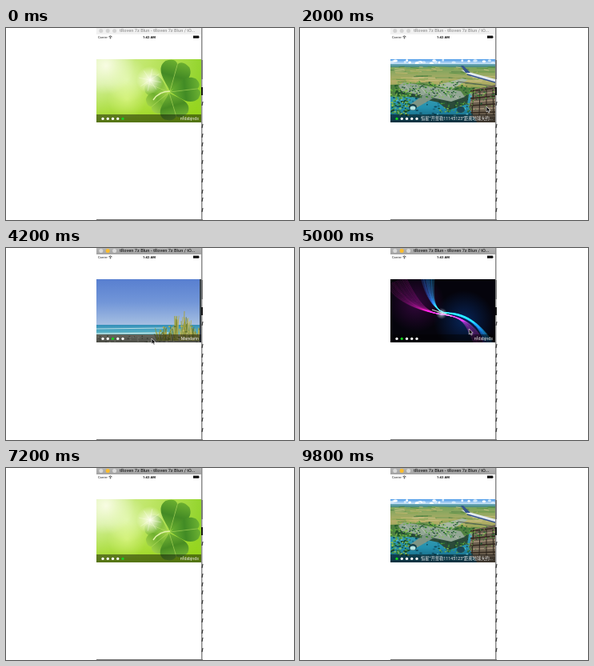
Write an HTML page with a canvas that moves like this. It is 360x240 px and loops after 10 s.

```html
<!DOCTYPE html>
<html lang="en">
<head>
<meta charset="utf-8">
<title>Carousel</title>
<style>
  html, body { margin: 0; width: 100%; height: 100%; overflow: hidden; background: #fff; }
  canvas { display: block; width: 360px; height: 240px; }
</style>
</head>
<body>
<canvas id="stage" width="360" height="240"></canvas>
<script>
const ctx = document.getElementById('stage').getContext('2d');
const LOOP = 10000, STEP = 200;
const W = 131, H = 79, X = 113, Y = 39;
const SANS = 'Roboto, "Noto Sans CJK SC", "Noto Sans CJK", sans-serif';

function random(seed) {
  return () => (seed = (seed * 16807) % 2147483647) / 2147483647;
}

function picture(draw) {
  const c = document.createElement('canvas');
  c.width = W;
  c.height = H;
  draw(c.getContext('2d'));
  return c;
}

function rect(g, color, x, y, w, h) {
  g.fillStyle = color;
  g.fillRect(x, y, w, h);
}

function shape(g, color, ...pts) {
  g.fillStyle = color;
  g.beginPath();
  pts.forEach(([x, y]) => g.lineTo(x, y));
  g.fill();
}

function disc(g, color, x, y, r, ry = r) {
  g.fillStyle = color;
  g.beginPath();
  g.ellipse(x, y, r, ry, 0, 0, 7);
  g.fill();
}

function line(g, color, width, x1, y1, x2, y2) {
  g.strokeStyle = color;
  g.lineWidth = width;
  g.beginPath();
  g.moveTo(x1, y1);
  g.lineTo(x2, y2);
  g.stroke();
}

function gradient(g, x1, y1, x2, y2, ...colors) {
  const fill = g.createLinearGradient(x1, y1, x2, y2);
  colors.forEach((c, i) => fill.addColorStop(i / (colors.length - 1), c));
  return fill;
}

function glow(g, rgb, alpha, x, y, r) {
  const fill = g.createRadialGradient(x, y, 0, x, y, r);
  fill.addColorStop(0, `rgba(${rgb},${alpha})`);
  fill.addColorStop(1, `rgba(${rgb},0)`);
  rect(g, fill, x - r, y - r, r * 2, r * 2);
}

function specks(g, rnd, colors, n, x, y, w, h, size = 2) {
  for (let i = 0; i < n; i++) {
    const color = colors[Math.floor(rnd() * colors.length)];
    disc(g, color, x + rnd() * w, y + rnd() * h, size * (0.4 + rnd() * 0.6), size * 0.5);
  }
}

// Heart-shaped leaf growing from (x, y) along an angle.
function leaf(g, x, y, angle, len, wide, light, dark) {
  g.save();
  g.translate(x, y);
  g.rotate(angle);
  g.fillStyle = gradient(g, 0, 0, len, 0, light, dark, light);
  for (const s of [-1, 1]) {
    g.beginPath();
    g.moveTo(0, 0);
    g.bezierCurveTo(len * 0.25, s * wide * 0.25, len * 0.55, s * wide * 0.85, len * 0.9, s * wide * 0.5);
    g.quadraticCurveTo(len * 1.08, s * wide * 0.15, len * 0.9, 0);
    g.fill();
  }
  line(g, 'rgba(190,225,110,.6)', 0.7, 0, 0, len * 0.9, 0);
  g.restore();
}

function drawClover(g) {
  rect(g, gradient(g, 0, 0, W, 20, '#d6f0a4', '#bfe667', '#93d42c'), 0, 0, W, H);
  rect(g, gradient(g, 0, 30, 0, H, 'rgba(160,220,30,0)', 'rgba(148,210,16,.85)'), 0, 30, W, H);
  glow(g, '255,255,240', 0.85, 12, 8, 36);
  glow(g, '240,255,200', 0.6, 38, 26, 28);
  glow(g, '235,255,150', 0.5, 38, 50, 24);
  leaf(g, 90, 41, -2.75, 30, 22, '#a5d550', '#79b938');
  leaf(g, 90, 42, 2.45, 30, 23, '#a0d148', '#70b030');
  leaf(g, 92, 40, -1.3, 39, 31, '#6cb030', '#438a25');
  leaf(g, 92, 41, -0.12, 38, 25, '#6cb232', '#418b25');
  leaf(g, 91, 42, 1.28, 34, 30, '#74b536', '#488c22');
  g.strokeStyle = '#e2f3aa';
  g.lineWidth = 1.4;
  g.beginPath();
  g.moveTo(92, 40);
  g.quadraticCurveTo(78, 40, 71, 51);
  g.stroke();
  glow(g, '255,255,240', 1, 67, 26, 17);
  for (let i = 0; i < 8; i++) {
    const a = i * Math.PI / 4 + 0.2;
    line(g, 'rgba(255,255,240,.5)', 0.7, 67, 26, 67 + Math.cos(a) * 14, 26 + Math.sin(a) * 14);
  }
}

function drawAirfield(g) {
  const rnd = random(41);
  const greens = ['#2c7a34', '#4c9c3c', '#1f5c30', '#6fae44', '#174426', '#8cc058'];
  const meadow = ['#558f45', '#86a752', '#c9bb78', '#a8ad5e', '#467c42', '#d0c58c'];
  rect(g, gradient(g, 0, 0, 0, 7, '#4c9ae8', '#e6f3fb'), 0, 0, W, 7);
  specks(g, rnd, ['#ffffff', '#d4e9fa'], 26, 0, 1, W, 4, 3);
  rect(g, gradient(g, 0, 6, 0, 11, '#6aa9c0', '#3f7f68'), 0, 6, W, 5);
  rect(g, gradient(g, 0, 10, 0, 45, '#78a35c', '#b3ae68', '#7f9a48'), 0, 10, W, 40);
  for (let i = 0; i < 110; i++) {
    const x = rnd() * W - 8, y = 9 + rnd() * 27, len = 4 + rnd() * 18;
    line(g, meadow[i % 6], 0.8, x, y, x + len, y + (rnd() - 0.3) * 2);
  }
  // pools
  rect(g, gradient(g, 0, 42, 0, H, '#3f9faf', '#2390ae', '#145a74'), 0, 43, W, 36);
  specks(g, rnd, ['#5cc3d2', '#176c86', '#0f4c60'], 60, 0, 46, 110, 26, 2);
  shape(g, '#4f8040', [0, 32], [40, 30], [104, 36], [92, 52], [42, 48], [0, 46]);
  // overgrown aircraft
  shape(g, '#2b4a3a', [12, 38], [74, 52], [98, 44], [96, 56], [72, 64], [60, 54], [14, 44]);
  shape(g, '#93a795', [10, 33], [17, 29], [88, 40], [93, 47], [76, 53], [14, 40]);
  shape(g, '#7d9484', [44, 43], [58, 46], [34, 60], [20, 60]);
  shape(g, '#a9b9a4', [56, 33], [90, 24], [97, 26], [76, 38]);
  specks(g, rnd, greens, 210, 6, 28, 90, 20, 1.5);
  specks(g, rnd, greens, 130, 0, 38, 26, 32, 1.8);
  specks(g, rnd, greens, 70, 60, 53, 48, 14, 1.6);
  for (let i = 0; i < 7; i++) line(g, '#c6cfbb', 0.7, 18 + i * 10, 32 + i * 1.5, 24 + i * 10, 39 + i * 1.7);
  // second aircraft and its tail
  shape(g, '#e3eaf0', [88, 13], [98, 16], [131, 25], [131, 29], [102, 22]);
  shape(g, '#35538f', [88, 8], [91, 8], [100, 17], [94, 17]);
  line(g, '#35508a', 1.4, 96, 19, 131, 29);
  line(g, '#4d5c50', 1, 84, 28, 131, 34);
  // ruined structure
  shape(g, '#6d6150', [104, 38], [131, 32], [131, 79], [108, 79], [98, 60]);
  for (let i = 0; i < 8; i++) line(g, i % 2 ? '#a5927a' : '#33291f', 1.3, 100, 40 + i * 4.5, 131, 36 + i * 5);
  for (let i = 0; i < 4; i++) line(g, '#2c241c', 1, 104 + i * 8, 38, 102 + i * 9, 70);
  specks(g, rnd, greens, 60, 96, 33, 35, 30, 1.4);
  disc(g, '#16414c', 28, 60, 5, 4);
  disc(g, '#b5e4e2', 28, 61, 3.5, 2.6);
  disc(g, '#1a4858', 88, 63, 5, 4);
}

function drawSwirl(g) {
  const rnd = random(97);
  rect(g, '#05040c', 0, 0, W, H);
  glow(g, '70,8,80', 0.7, 32, 30, 36);
  glow(g, '8,50,120', 0.7, 92, 52, 38);
  g.globalCompositeOperation = 'lighter';
  const strand = (color, x0, y0, x1, y1) => {
    g.strokeStyle = color;
    g.lineWidth = 0.8;
    g.beginPath();
    g.moveTo(x0, y0);
    g.bezierCurveTo(x0 + 18, 34, 48, 42, 65, 44);
    g.bezierCurveTo(92, 47, x1 - 10, y1 - 22, x1, y1);
    g.stroke();
  };
  for (let i = 0; i < 22; i++) {
    const k = i / 22;
    strand(`rgba(190,15,140,${0.14 + rnd() * 0.2})`, -6 + k * 26, 8 - k * 12, 104 + k * 14, 80);
  }
  for (let i = 0; i < 24; i++) {
    const k = i / 24;
    g.strokeStyle = `rgba(15,${110 + Math.floor(k * 70)},225,${0.15 + rnd() * 0.25})`;
    g.lineWidth = 0.8;
    g.beginPath();
    g.moveTo(38 + k * 18, -2);
    g.bezierCurveTo(44 + k * 10, 22, 54, 38, 68, 42);
    g.bezierCurveTo(92, 46 - k * 6, 112, 54, 116 + k * 14, 80);
    g.stroke();
  }
  g.globalCompositeOperation = 'source-over';
  glow(g, '225,235,255', 0.8, 64, 43, 7);
  line(g, 'rgba(255,255,255,.8)', 1.2, 52, 38, 76, 46);
}

function drawBeach(g) {
  const rnd = random(23);
  rect(g, gradient(g, 0, 0, 0, 58, '#587fd0', '#7296d8', '#a7c0e2'), 0, 0, W, 58);
  rect(g, gradient(g, 0, 57, 0, 70, '#348fb9', '#62bdc8'), 0, 57, W, 12);
  line(g, '#d8edf0', 0.8, 0, 62, 85, 61);
  line(g, '#e8f2ee', 1, 0, 68, 90, 67);
  rect(g, gradient(g, 0, 69, 0, H, '#b8b8a8', '#8d8f83'), 0, 69, W, 10);
  specks(g, rnd, ['#70756a', '#c9c8ba', '#596450'], 45, 0, 71, W, 8, 1.5);
  const blades = ['#8d9938', '#b4ad4b', '#64752e', '#c7bc67'];
  for (let i = 0; i < 130; i++) {
    const x = 76 + rnd() * 54, tall = (x > 96 && x < 118 ? 30 : 17) * (0.4 + rnd() * 0.65);
    line(g, blades[i % 4], 0.8, x, 77, x + (rnd() - 0.5) * 9, 77 - tall);
  }
  line(g, '#a4a14c', 1, 109, 74, 110, 40);
  specks(g, rnd, blades, 38, 80, 58, 50, 18, 1.8);
  rect(g, '#39434b', 129, 0, 2, H);
}

const plane = { img: picture(drawAirfield), text: '恒星“开普勒11145123”距离地球大约...' };
const swirl = { img: picture(drawSwirl), text: 'nfdsbjnds' };
const beach = { img: picture(drawBeach), text: 'Mandarin' };
const clover = { img: picture(drawClover), text: 'nfdsbjnds' };
const pages = [plane, swirl, beach, beach, clover];
const wrap = i => ((i % 5) + 5) % 5;

// start, duration, from page, to page
const swipes = [
  [1000, 600, -1, 0], [2400, 600, 0, 1], [3200, 600, 1, 2], [4400, 500, 2, 1],
  [5000, 500, 1, 0], [5800, 1220, 0, -1], [9000, 600, -1, 0]
];

function scroll(t) {
  let pos = -1, page = -1;
  for (const [start, dur, from, to] of swipes) {
    if (t < start) break;
    const p = Math.min(1, (t - start) / dur);
    pos = from + (to - from) * (1 - (1 - p) ** 4);
    page = p < 1 ? from : to;
  }
  return { pos, page };
}

// time, x, y
const pointer = [
  [1800, 236, 96], [2000, 233, 98], [2400, 170, 94], [2800, 126, 94], [3200, 145, 98],
  [3800, 178, 111], [4200, 182, 113], [4800, 205, 104], [5600, 230, 92],
  [8000, 190, 96], [8600, 184, 88], [9200, 184, 88]
];

function drawPointer(t) {
  if (t < 1800 || t > 9200 || (t > 5600 && t < 8000)) return;
  const i = Math.max(1, pointer.findIndex(p => p[0] >= t));
  const [t0, x0, y0] = pointer[i - 1], [t1, x1, y1] = pointer[i];
  const k = (t - t0) / (t1 - t0);
  ctx.save();
  ctx.translate(x0 + (x1 - x0) * k, y0 + (y1 - y0) * k);
  shape(ctx, '#111', [0, 0], [0, 7], [1.7, 5.6], [2.8, 8], [4, 7.4], [3, 5.2], [5, 5]);
  ctx.closePath();
  ctx.strokeStyle = '#fff';
  ctx.lineWidth = 0.6;
  ctx.stroke();
  ctx.restore();
}

function label(text, x, y, font, color, align = 'left') {
  ctx.font = font + ' ' + SANS;
  ctx.fillStyle = color;
  ctx.textAlign = align;
  ctx.textBaseline = 'middle';
  ctx.fillText(text, x, y);
}

function drawWindow(t) {
  const active = t >= 2400;
  rect(ctx, '#fff', 0, 0, 360, 240);
  rect(ctx, active ? gradient(ctx, 0, 0, 0, 8, '#b4b4b4', '#a2a2a2') : '#f1f1f1', 113, 0, 132, 8);
  const lights = active ? ['#d9d9d9', '#fcbd2c', '#d9d9d9'] : ['#d3d3d3', '#d3d3d3', '#d3d3d3'];
  lights.forEach((c, i) => disc(ctx, c, 118.8 + i * 8.4, 3.4, 2.5));
  label('tRoven 7z Blun - tRoven 7z Blun / tO...', 142, 3.8, '500 5.6px', active ? '#222' : '#999');

  label('Carrier', 115, 11.5, '4px', '#222');
  ctx.strokeStyle = '#222';
  ctx.lineWidth = 0.8;
  for (const r of [1.4, 2.9]) {
    ctx.beginPath();
    ctx.arc(130.5, 13, r, -2.35, -0.8);
    ctx.stroke();
  }
  disc(ctx, '#222', 130.5, 12.8, 0.6);
  label(t < 5000 ? '1:42 AM' : '1:43 AM', 179, 11.5, 'bold 4.2px', '#111', 'center');
  rect(ctx, '#111', 234, 9.6, 7, 3.2);
  rect(ctx, '#111', 241.3, 10.6, 0.6, 1.4);
}

function drawEdges() {
  rect(ctx, '#8c8c8c', 244, 0, 1, 240);
  rect(ctx, '#c4c4c4', 245, 0, 1, 240);
  rect(ctx, '#777', 113, 239, 133, 1);
  rect(ctx, '#161616', 244, 74, 2, 10);
  rect(ctx, '#777', 244, 40, 2, 24);
  for (const y of [92, 120, 132, 143, 153, 165, 177, 188, 202, 212, 225]) {
    line(ctx, '#333', 1.2, 246, y, 245, y + 5);
  }
}

function drawCarousel(t) {
  const { pos, page } = scroll(t);
  const first = Math.floor(pos);
  ctx.save();
  ctx.beginPath();
  ctx.rect(X, Y, W, H);
  ctx.clip();
  for (const i of [first, first + 1]) {
    ctx.drawImage(pages[wrap(i)].img, X + (i - pos) * W, Y);
  }
  rect(ctx, 'rgba(0,0,0,.45)', X, 108, W, 10);
  const current = wrap(page);
  for (let i = 0; i < 5; i++) {
    disc(ctx, i === current ? '#16d321' : '#fff', 121 + i * 6.25, 113.4, 1.65);
  }
  label(pages[current].text, 241, 113.6, '5.3px', '#eee', 'right');
  ctx.restore();
}

function frame(now) {
  const t = Math.floor((now % LOOP) / STEP) * STEP;
  drawWindow(t);
  drawCarousel(t);
  drawEdges();
  drawPointer(t);
  requestAnimationFrame(() => frame(performance.now() - began));
}

const began = performance.now();
frame(0);
</script>
</body>
</html>
```
